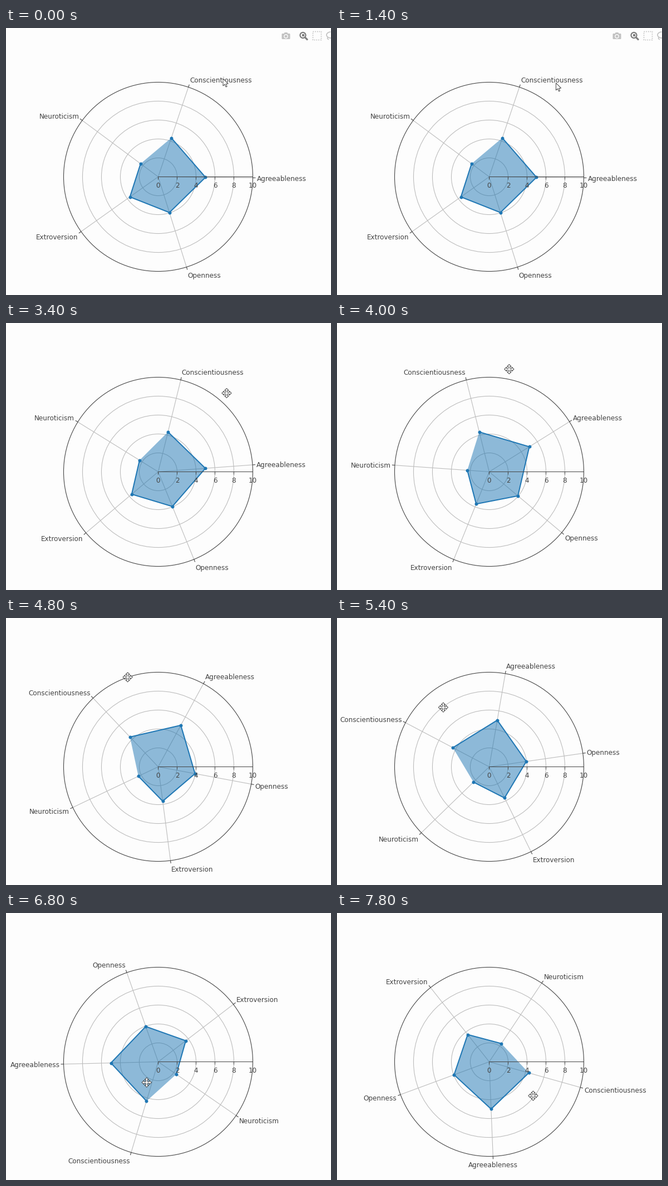
Recreate the animation shown at these times as a matplotlib script. Size 584 by 480 pixels, loop 8000 ms.

```python
import numpy as np
import matplotlib.pyplot as plt
from matplotlib.animation import FuncAnimation
from matplotlib.patches import Circle, FancyBboxPatch, Polygon, Rectangle

W, H, DPI = 584, 480, 64
PT = 72 / DPI                     # points per pixel
STEP, FRAMES = 200, 40
CX, CY, UNIT = 273.5, 267.5, 17
R = 10 * UNIT
BG, DARK, GRID, BLUE = "#fdfdfd", "#444444", "#bcbcbc", "#1f77b4"

SCORES = {"Agreeableness": 5, "Conscientiousness": 4.34, "Neuroticism": 2.32,
          "Extroversion": 3.67, "Openness": 3.96}
N = len(SCORES)
DRAG_START = 2800

# key points (time, value); glide() eases between them
TURN = [(2800, -0.6), (3800, 11.7), (4000, 32), (5400, 80.2), (6200, 113),
        (6800, 181.4), (7800, 272.3)]
HOVER = [(0, 0), (1000, 1.5), (1500, 0), (2000, 1.5), (2200, 1)]
REACH = [(2800, 187), (4200, 188), (5400, 135), (6200, 67.7), (6800, 42.5),
         (7800, 99.8)]
LEAD = [(2800, 42.8), (4000, 47), (6200, 47.9), (6800, 59.4), (7800, 50)]


def glide(t, keys):
    """Monotone cubic through the keys, at rest at both ends."""
    x, y = np.transpose(keys)
    t = np.clip(t, x[0], x[-1])
    h, d = np.diff(x), np.diff(y) / np.diff(x)
    m = np.zeros(len(x))
    for j in range(1, len(x) - 1):
        if d[j - 1] * d[j] > 0:
            m[j] = 2 * d[j - 1] * d[j] / (d[j - 1] + d[j])
    k = min(np.searchsorted(x, t, side="right") - 1, len(h) - 1)
    u = (t - x[k]) / h[k]
    blend = u * u * (3 - 2 * u)
    return (y[k] + (y[k + 1] - y[k]) * blend
            + h[k] * u * (1 - u) * (m[k] * (1 - u) - m[k + 1] * u))


def rotate(pts, deg):
    c, s = np.cos(np.radians(deg)), np.sin(np.radians(deg))
    return pts @ np.array([[c, s], [-s, c]])


def polar(r, deg):
    a = np.radians(deg)
    return CX + r * np.cos(a), CY - r * np.sin(a)


ARROW = np.array([(0, 0), (0, 13), (3, 10.3), (5.2, 15), (7.2, 14.1),
                  (5.1, 9.5), (9.2, 9.2)])
BARB = np.array([(-1.4, -1.4), (-1.4, -4.8), (-3.8, -4.8), (0, -8.6),
                 (3.8, -4.8), (1.4, -4.8)])
MOVE = np.vstack([rotate(BARB, q) for q in range(0, 360, 90)])

fig = plt.figure(figsize=(W / DPI, H / DPI), dpi=DPI, facecolor=BG)
ax = fig.add_axes([0, 0, 1, 1])
ax.set_xlim(0, W)
ax.set_ylim(H, 0)
ax.axis("off")


def line(x, y, color, width=1, z=1, **kw):
    return ax.plot(x, y, color=color, lw=width * PT, zorder=z, snap=False,
                   solid_capstyle="butt", **kw)[0]


def ring(x, y, r, color, width=1, z=1):
    return ax.add_patch(Circle((x, y), r, fc="none", ec=color,
                               lw=width * PT, zorder=z))


def label(x, y, text):
    return ax.text(x, y, text, family="DejaVu Sans", size=12 * PT, color=DARK,
                   va="baseline", ha="center", zorder=6)


def draw_toolbar():
    light, strong = "#c2c2c2", "#7d7d7d"
    lasso = np.radians(np.linspace(95, 300, 30))
    patches = [
        FancyBboxPatch((496, 10.5), 14, 9, fc=light, ec=light, lw=PT,
                       boxstyle="round,pad=0,rounding_size=1"),
        Polygon([(499.5, 10.5), (500.5, 8), (505.5, 8), (506.5, 10.5)],
                fc=light, ec="none"),
        Rectangle((531.5, 11), 4, 4, fc=strong, ec="none"),
        Rectangle((551.5, 6.5), 15, 15, fc="none", ec=light, lw=1.7 * PT,
                  ls=(0, (1, 1.2)), capstyle="butt", snap=False),
    ]
    for patch in patches:
        ax.add_patch(patch)
    return patches + [
        ring(503, 15, 3.2, BG, 1.4),
        ring(533.5, 13, 5, strong, 2.2),
        line([537, 542], [16.5, 21.5], strong, 3),
        line(584 + 8 * np.cos(lasso), 12.5 - 5.5 * np.sin(lasso), light, 1.7),
        line([578, 577.5, 580], [16, 19, 21], light, 1.5),
    ]


toolbar = draw_toolbar()

for v in range(2, 10, 2):
    ring(CX, CY, v * UNIT, GRID, 1.1)
ring(CX, CY, R, DARK, 1.1, z=4)

line([CX, CX + R], [CY, CY], DARK, 1, z=4)
for v in range(0, 11, 2):
    x = CX + v * UNIT
    line([x, x], [CY, CY + 5], DARK, 1, z=4)
    label(x, 287, str(v))

spokes = [line([], [], GRID, 1.1) for _ in SCORES]
ticks = [line([], [], DARK, 1.1, z=4) for _ in SCORES]
labels = [label(0, 0, name) for name in SCORES]
area = ax.add_patch(Polygon(np.zeros((N, 2)), fc=BLUE, ec="none",
                            alpha=0.5, zorder=2))
outline = line([], [], BLUE, 2, z=3, marker="o", ms=6 * PT, mew=0,
               solid_joinstyle="round")
pointer = ax.add_patch(Polygon(ARROW, fc="white", ec="#333333",
                               lw=0.9 * PT, zorder=9))


def place_label(text, deg):
    c, s = np.cos(np.radians(deg)), np.sin(np.radians(deg))
    text.set_ha("center" if abs(c) < 0.1 else "left" if c > 0 else "right")
    text.set_position((CX + 177 * c, 272.7 - 184.8 * s))


def pointer_pos(t, turn):
    if t < DRAG_START:
        s = glide(t, HOVER)
        return 390 + 22 * min(s, 1), 91 + 50.5 * s
    return polar(glide(t, REACH), turn + glide(t, LEAD))


def update(i):
    t = i * STEP
    turn = glide(t, TURN)
    angles = turn + np.arange(N) * 360 / N
    for deg, spoke, tick, text in zip(angles, spokes, ticks, labels):
        spoke.set_data(*np.transpose([polar(0, deg), polar(R, deg)]))
        tick.set_data(*np.transpose([polar(R, deg), polar(R + 5, deg)]))
        place_label(text, deg)

    pts = np.transpose(polar(np.array(list(SCORES.values())) * UNIT, angles))
    area.set_xy(pts)
    # the outline stays open between Neuroticism and Conscientiousness
    outline.set_data(*pts[[1, 0, 4, 3, 2]].T)

    x, y = pointer_pos(t, turn)
    outside = np.hypot(x - CX, y - CY) > 195
    pointer.set_xy((ARROW if outside else MOVE) + (x, y))

    for part in toolbar:
        part.set_alpha(np.clip((3400 - t) / 400, 0, 1))
    return []


anim = FuncAnimation(fig, update, frames=FRAMES, interval=STEP,
                     init_func=lambda: update(0), repeat=True, repeat_delay=0)
plt.show()
```
